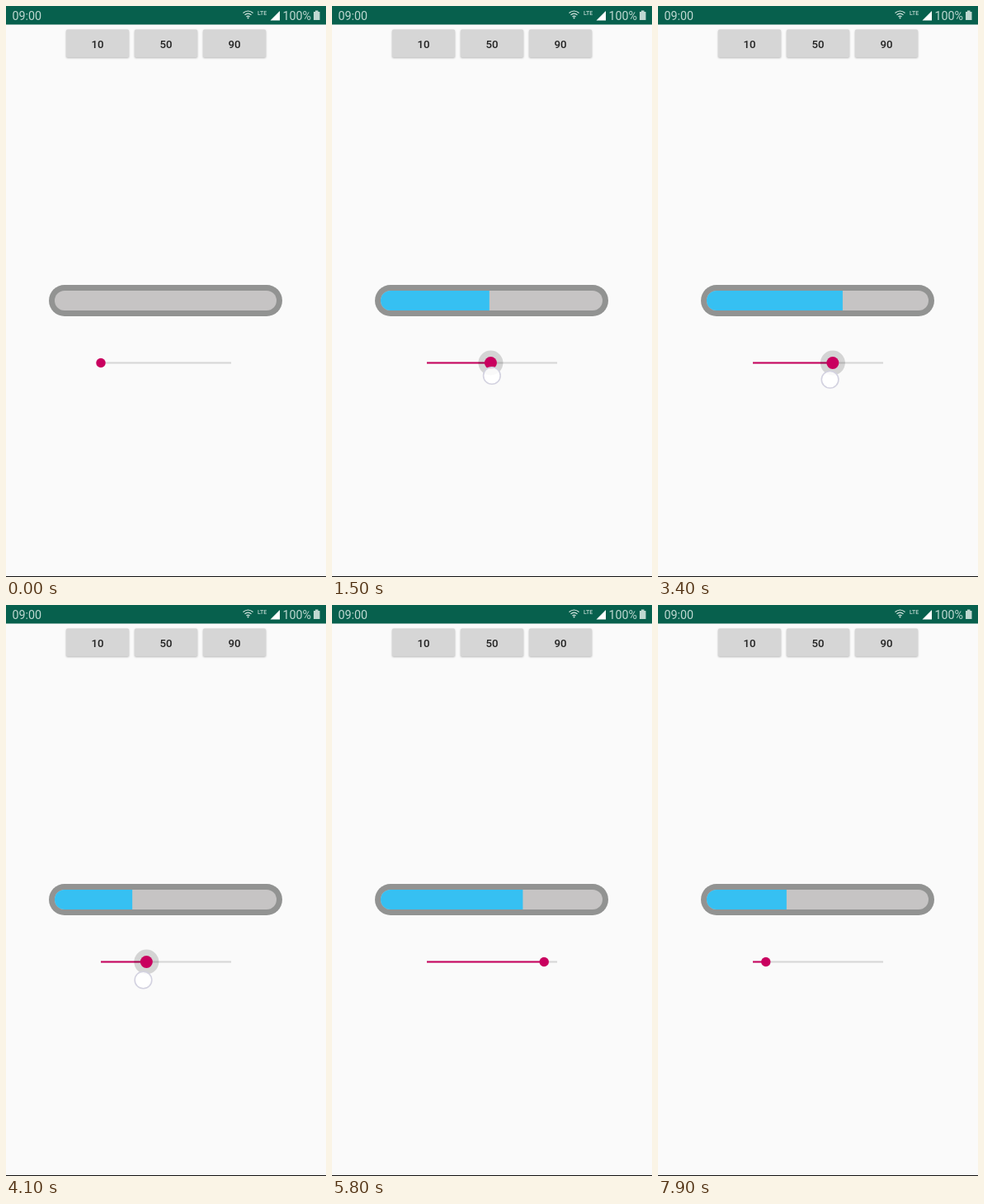
Animation, 388 px wide and 692 px high, one loop 8 s. Source, as an HTML page:

```html
<!DOCTYPE html>
<html lang="en">
<head>
<meta charset="utf-8">
<title>Progress bar demo</title>
<style>
  html, body { margin: 0; height: 100%; overflow: hidden; background: #fafafa; }
  svg { display: block; width: 388px; height: 692px; font-family: Roboto, sans-serif; }
  .status { fill: #bfd8d1; }
  .button rect { fill: #d6d7d7; }
  .button text { font-size: 13.2px; font-weight: 500; fill: #222; text-anchor: middle; }
</style>
</head>
<body>
<svg viewBox="0 0 388 692">
  <defs>
    <clipPath id="inner"><rect x="59" y="345" width="269" height="24" rx="12"/></clipPath>
  </defs>

  <rect width="388" height="22.5" fill="#07604d"/>
  <g class="status">
    <text x="7.5" y="17" font-size="14.3">09:00</text>
    <text x="335.5" y="17" font-size="14.3">100%</text>
    <text x="305" y="11" font-size="6.8" font-weight="500">LTE</text>
    <path d="M373 7h2v-1.500h3.500v1.500h2v10h-7.500z"/>
  </g>
  <path d="M320.500 17.500L332 6v11.500z" fill="#fff"/>
  <g fill="none" stroke="#d5e5e0" stroke-width="1.2">
    <path d="M287.500 8.500q6-5 12 0M289.500 10.800q4-3.400 8 0M291.500 13q2-1.700 4 0"/>
  </g>
  <circle cx="293.500" cy="14.500" r="1" fill="#d5e5e0"/>

  <g id="buttons"></g>

  <rect x="52" y="338" width="283" height="38" rx="19" fill="#929392"/>
  <g clip-path="url(#inner)">
    <rect x="59" y="345" width="269" height="24" fill="#c6c4c4"/>
    <rect id="fill" x="59" y="345" width="0" height="24" fill="#36c0f2"/>
  </g>

  <path d="M115 432.500H273" stroke="#d6d6d6" stroke-width="2"/>
  <path id="track" stroke="#c9005f" stroke-width="2"/>
  <circle id="halo" cy="432.500" r="15" fill="#000" fill-opacity=".15"/>
  <circle id="thumb" cy="432.500" fill="#c9005f"/>
  <circle id="touch" r="10.3" fill="#fff" fill-opacity=".85" stroke="#d3d2e0" stroke-width="1.6"/>
  <rect y="691" width="388" height="1" fill="#111"/>
</svg>
<script>
const $ = id => document.getElementById(id);
const set = (el, attrs) => { for (const k in attrs) el.setAttribute(k, attrs[k]); };
const clamp = x => Math.min(1, Math.max(0, x));
const ease = x => (1 - Math.cos(Math.PI * clamp(x))) / 2;

const LOOP = 8000, STEP = 100, DRAG_START = 200, DRAG_END = 4500;

// Drag positions as [time, value], joined by a smooth curve
const drag = [
  [200, 0], [1000, .35], [1500, .49], [1600, .53], [1800, .87], [2050, .8],
  [2300, .865], [2400, .81], [2500, .5], [2950, .89], [3200, .66],
  [3400, .613], [3600, .53], [4100, .35], [4500, .15]
];

// Button taps: the bar eases to the value after release
const taps = [
  { button: 2, down: 5100, up: 5200, from: .15, to: .9, length: 1000 },
  { button: 0, down: 6800, up: 7182, from: .9, to: .1, length: 1170 }
];

function slope(i) {
  const a = drag[Math.max(0, i - 1)], b = drag[Math.min(drag.length - 1, i + 1)];
  return (b[1] - a[1]) / (b[0] - a[0]);
}

function dragAt(t) {
  const last = drag.length - 1;
  if (t <= drag[0][0]) return drag[0][1];
  if (t >= drag[last][0]) return drag[last][1];
  const i = drag.findIndex(k => k[0] > t) - 1;
  const [t0, a] = drag[i], [t1, b] = drag[i + 1];
  const h = t1 - t0, u = (t - t0) / h, s = u * u * (3 - 2 * u);
  return clamp(a + (b - a) * s + h * u * (1 - u) * ((1 - u) * slope(i) - u * slope(i + 1)));
}

const buttons = [10, 50, 90].map((label, i) => {
  const x = 73 + 83 * i;
  $('buttons').insertAdjacentHTML('beforeend',
    `<g class="button"><rect x="${x}" y="28.500" width="76" height="33.500" rx="1.5"/>
     <text x="${x + 38}" y="50.700">${label}</text></g>`);
  return $('buttons').lastElementChild.firstElementChild;
});

function draw(t) {
  const held = t >= DRAG_START && t < DRAG_END;
  let value = dragAt(t), bar = value;
  let touch = held && [115 + 158 * dragAt(t + 55), 444.25 + .0025 * t];
  const press = [0, 0, 0];

  for (const tap of taps) {
    if (t < tap.down) continue;
    press[tap.button] = t <= tap.up ? 1 : clamp(1 - (t - tap.up) / 400);
    if (t <= tap.up) touch = [111 + 83 * tap.button, 48];
    if (t >= tap.up) {
      value = tap.to;
      bar = tap.from + (tap.to - tap.from) * ease((t - tap.up) / tap.length);
    }
  }

  const x = 115 + 158 * value;
  set($('fill'), { width: 269 * bar });
  set($('track'), { d: `M115 432.500H${x}` });
  set($('thumb'), { cx: x, r: held ? 7.5 : 5.7 });
  set($('halo'), { cx: x, visibility: held ? 'visible' : 'hidden' });
  set($('touch'), { cx: touch ? touch[0] : 0, cy: touch ? touch[1] : 0,
    visibility: touch ? 'visible' : 'hidden' });
  buttons.forEach((b, i) => {
    const p = press[i], grey = 214 - 22 * p;
    b.style.fill = `rgb(${grey},${grey},${grey})`;
    b.style.filter = `drop-shadow(0 ${1 + p}px ${1 + 2 * p}px rgba(0,0,0,.28))`;
  });
}

const start = performance.now();
function tick() {
  const t = (performance.now() - start) % LOOP;
  draw(Math.floor(t / STEP) * STEP);
  requestAnimationFrame(tick);
}
tick();
</script>
</body>
</html>
```
